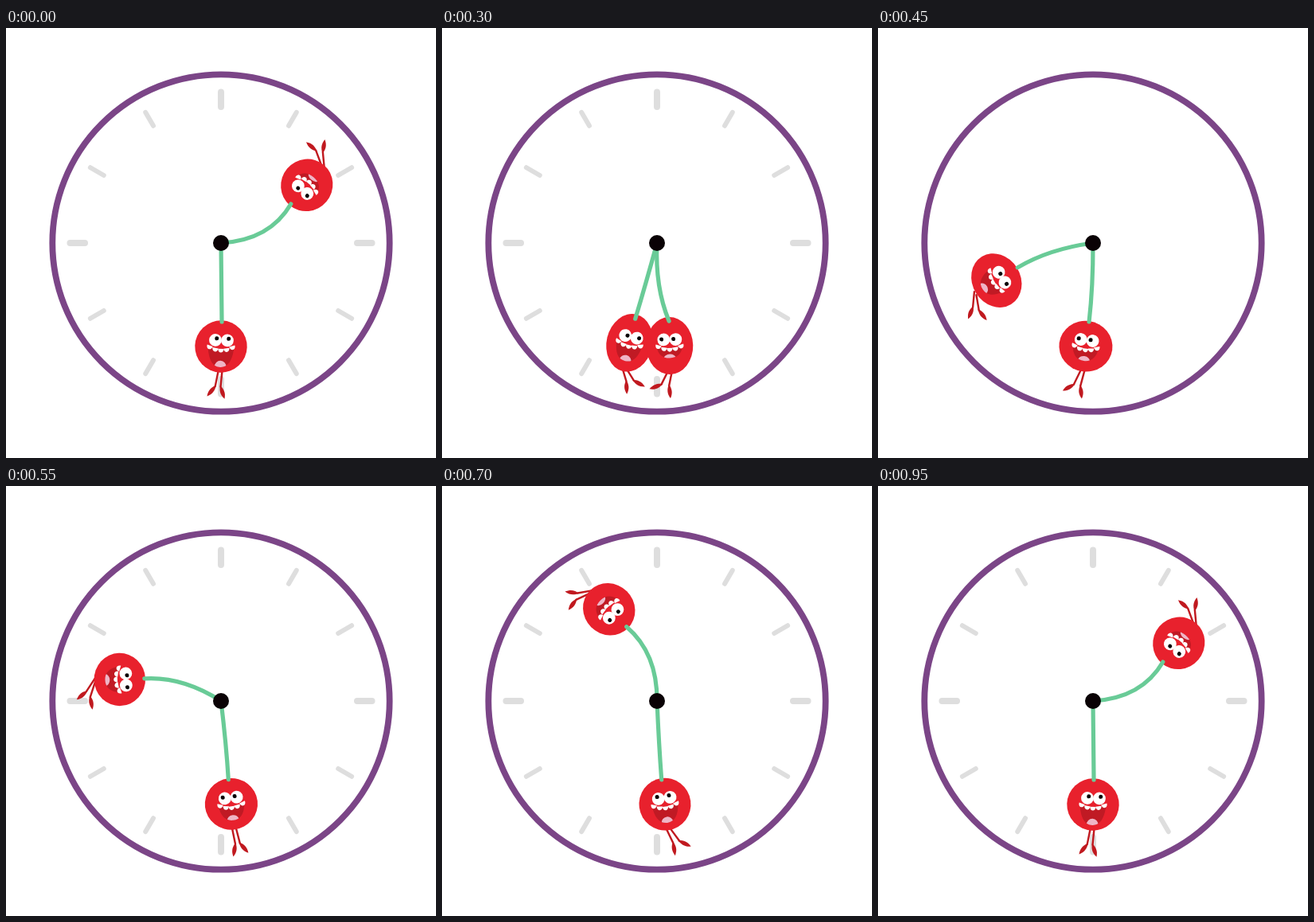
Write an HTML page with a canvas that moves like this. It is 540 px wide and 540 px high and loops after 1 s.

```html
<!DOCTYPE html>
<html lang="en">
<head>
<meta charset="utf-8">
<title>Cherry clock</title>
<style>
  html, body { margin: 0; width: 100%; height: 100%; overflow: hidden; background: #fff; }
  canvas { display: block; width: 100vw; height: 100vh; }
</style>
</head>
<body>
<canvas id="stage" width="540" height="540"></canvas>
<script>
const ctx = document.getElementById('stage').getContext('2d');
const RAD = Math.PI / 180;
const STEP = 50, STEPS = 20, HALF = 19, TURN = 2 * HALF;
const PIVOT = 270, REACH = 130, BALL = 32.7;
const STRIKE = 6, STRUCK = 25;
const COLOR = {
  ring: '#7b4587', tick: '#dedede', stem: '#69cb97', hub: '#0a0205',
  skin: '#e8212d', limb: '#c0191f', mouth: '#c01a24', tongue: '#efb5c6'
};

// Each cherry strikes, hangs, is struck and flies round: one turn takes two loops.
// Key points of the hand: [step, clockwise angle]
const SWING = [
  [6, 173], [9, 184], [11, 174.3], [14, 175.6], [19, 180], [22, 177.8],
  [25, 195.4], [28, 248.8], [30, 282], [33, 332.4], [38, 416], [41, 483.1]
];

const { sin, cos, exp, abs, min, max } = Math;
const clamp = v => min(1, max(0, v));
const mix = (a, b, k) => a + (b - a) * k;
const wobble = (s, decay, half) => exp(-s / decay) * cos(Math.PI * s / half);

function swingKey(i) {
  const n = SWING.length, lap = Math.floor(i / n);
  const [step, angle] = SWING[i - lap * n];
  return [step + lap * TURN, angle + lap * 360];
}

// Cubic Hermite through the unevenly spaced key points.
function handAngle(t) {
  let i = 0;
  while (swingKey(i + 1)[0] <= t) i++;
  const [a, b, c, d] = [-1, 0, 1, 2].map(k => swingKey(i + k));
  const h = c[0] - b[0], u = (t - b[0]) / h, u2 = u * u, u3 = u2 * u;
  const m0 = (c[1] - a[1]) / (c[0] - a[0]) * h;
  const m1 = (d[1] - b[1]) / (d[0] - b[0]) * h;
  return (2 * u3 - 3 * u2 + 1) * b[1] + (u3 - 2 * u2 + u) * m0 +
         (3 * u2 - 2 * u3) * c[1] + (u3 - u2) * m1;
}

function poseAt(step) {
  const t = step < STRIKE ? step + TURN : step;
  const since = t - STRIKE;
  const angle = handAngle(t), phi = angle - 180;
  const air = clamp((t - STRUCK + 2) / 3);
  const wave = peak => cos(2 * Math.PI * (t - peak) / TURN);

  // Hanging, everything swings out after the blow; flying, it trails behind.
  const sway = 31 * wobble(since - 1.3, 12, 6.5);
  const trail = 87 * abs((phi - 130) / 222) ** 3 - 55;
  const leg = mix(sway, trail, air);
  return {
    angle,
    tilt: phi + mix(sway * .2, -18 * sin(phi / 2 * RAD), air),
    bend: mix(11 * wobble(since, 3, 4), 27 * sin((phi - 20) * .45 * RAD), air),
    squash: t < STRUCK ? .1 * wobble(since, 3, 4) : .12 * wobble(t - STRUCK, 8, 3.5),
    mouth: 19.5 + 6.5 * wave(19.5),
    gaze: 80 * wave(25.5),
    leg,
    spread: 15 * min(1, abs(leg) / 25),
    foot: 23 + leg * .5 + leg * leg * .007
  };
}

// Point at a clockwise bearing from straight up.
const polar = (x, y, deg, r) => [x + r * sin(deg * RAD), y - r * cos(deg * RAD)];

function ellipse(x, y, rx, ry, fill) {
  ctx.beginPath();
  ctx.ellipse(x, y, rx, ry, 0, 0, 2 * Math.PI);
  ctx.fillStyle = fill;
  ctx.fill();
}

function line(from, to, width, color) {
  ctx.beginPath();
  ctx.moveTo(...from);
  ctx.lineTo(...to);
  ctx.lineWidth = width;
  ctx.strokeStyle = color;
  ctx.stroke();
}

function drawLeg(hip, leg, foot) {
  const start = polar(0, 0, 180 + hip, BALL - 1.5);
  const knee = polar(...start, 180 + leg, 19.5);
  line(start, knee, 2.4, COLOR.limb);
  ctx.save();
  ctx.translate(...knee);
  ctx.rotate(foot * RAD);
  ctx.beginPath();
  ctx.moveTo(0, -2);
  ctx.bezierCurveTo(3, 4, 4, 9, 0, 16);
  ctx.bezierCurveTo(-4, 9, -3, 4, 0, -2);
  ctx.fillStyle = COLOR.limb;
  ctx.fill();
  ctx.restore();
}

function drawMouth(depth) {
  ctx.save();
  ctx.beginPath();
  ctx.moveTo(-16.5, 0);
  ctx.quadraticCurveTo(0, 6, 16.5, 0);
  ctx.bezierCurveTo(15, depth * .7, 9, depth, 0, depth);
  ctx.bezierCurveTo(-9, depth, -15, depth * .7, -16.5, 0);
  ctx.fillStyle = COLOR.mouth;
  ctx.fill();
  ctx.clip();
  ellipse(0, depth, 7.5, depth * .32, COLOR.tongue);
  ctx.restore();

  ctx.fillStyle = '#fff';
  for (let i = -2; i <= 2; i++) {
    ctx.save();
    ctx.translate(i * 6.9, 2.9 - i * i * .95);
    ctx.rotate(-i * 9 * RAD);
    ctx.beginPath();
    ctx.moveTo(-3.7, 0);
    ctx.bezierCurveTo(-3.4, 6.3, 3.4, 6.3, 3.7, 0);
    ctx.closePath();
    ctx.fill();
    ctx.restore();
  }
}

function drawCherry({ angle, tilt, bend, squash, mouth, gaze, leg, spread, foot }) {
  const [x, y] = polar(PIVOT, PIVOT, angle, REACH);

  ctx.save();
  ctx.translate(x, y);
  ctx.rotate(tilt * RAD);
  drawLeg(4.5, leg, leg + foot);
  drawLeg(-4.5, leg - spread, leg - spread - 35 + foot * .4);
  ellipse(0, 0, BALL * (1 - squash), BALL * (1 + squash), COLOR.skin);
  drawMouth(mouth);
  for (const ex of [-7.3, 7.7]) {
    ellipse(ex, -7.8, 7.9, 7.9, '#fff');
    ellipse(...polar(ex, -7.8, gaze, 2.8), 2.5, 2.5, COLOR.hub);
  }
  ctx.restore();

  const [ex, ey] = polar(x, y, tilt, 31);
  const dx = ex - PIVOT, dy = ey - PIVOT, side = bend / Math.hypot(dx, dy);
  ctx.beginPath();
  ctx.moveTo(PIVOT, PIVOT);
  ctx.quadraticCurveTo(PIVOT + dx * .55 - dy * side, PIVOT + dy * .55 + dx * side, ex, ey);
  ctx.lineWidth = 5.2;
  ctx.strokeStyle = COLOR.stem;
  ctx.stroke();
}

function drawDial(ticks) {
  for (let i = 0; ticks && i < 12; i++) {
    const major = i % 3 === 0;
    line(polar(PIVOT, PIVOT, i * 30, major ? 171 : 170),
         polar(PIVOT, PIVOT, i * 30, 189.5), major ? 8 : 6, COLOR.tick);
  }
  ctx.beginPath();
  ctx.arc(PIVOT, PIVOT, 211.7, 0, 2 * Math.PI);
  ctx.lineWidth = 7.8;
  ctx.strokeStyle = COLOR.ring;
  ctx.stroke();
}

function draw(now) {
  const step = Math.floor(now / STEP) % STEPS;
  ctx.fillStyle = '#fff';
  ctx.fillRect(0, 0, 540, 540);
  ctx.lineCap = 'round';
  drawDial(step !== 9); // the ticks blink off for one step
  drawCherry(poseAt(step + HALF));
  drawCherry(poseAt(step));
  ellipse(PIVOT, PIVOT, 10, 10, COLOR.hub);
}

let start;
function loop(now) {
  start ??= now;
  draw(max(0, now - start));
  requestAnimationFrame(loop);
}
draw(0);
requestAnimationFrame(loop);
</script>
</body>
</html>
```
